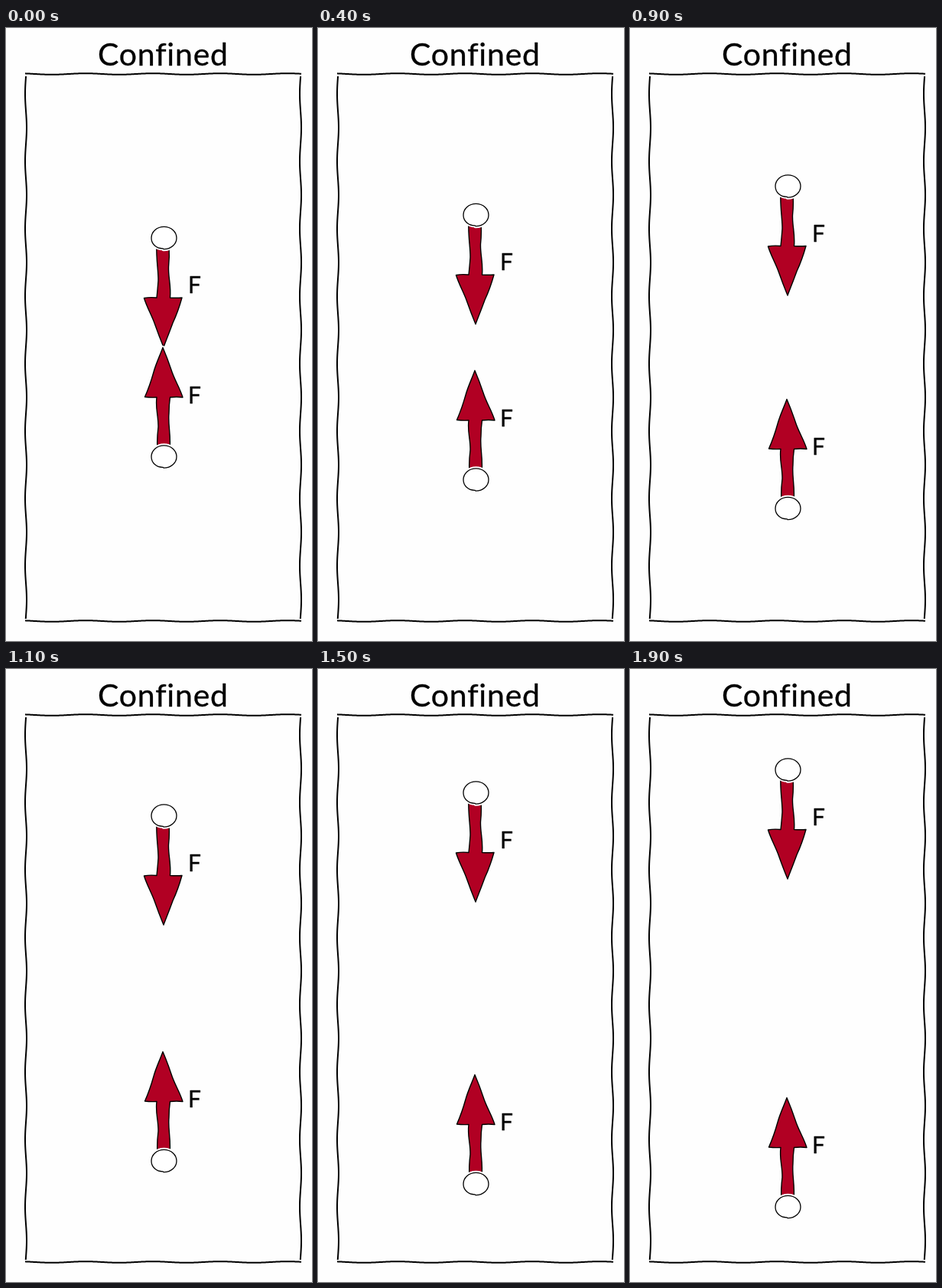
Recreate the animation shown at these times as an HTML page. Size 400 by 800 pixels, loop 2 s.

```html
<!DOCTYPE html>
<html lang="en">
<head>
<meta charset="utf-8">
<title>Confined</title>
<style>
  html, body { margin: 0; width: 100%; height: 100%; overflow: hidden; background: #fefefe; }
  svg { display: block; width: 400px; height: 800px; }
  path { stroke-linejoin: round; stroke-linecap: round; }
  .border { fill: none; stroke: #000; stroke-width: 2; stroke-linecap: butt; }
  .halo { fill: #fff; stroke: #fff; stroke-width: 5; }
  .arrow { fill: #b10023; stroke: #000; stroke-width: 1.4; }
  .ball { fill: #fff; stroke: #000; stroke-width: 1.3; }
  text { font-family: Lato, "Open Sans", sans-serif; stroke: #000; stroke-linejoin: round; }
  .title { font-size: 41px; letter-spacing: .8px; stroke-width: .3; font-variant-ligatures: none; }
  .label { font-size: 30px; stroke-width: .3; }
</style>
</head>
<body>
<svg viewBox="0 0 400 800">
  <defs>
    <path id="ball" d="M205.500 13.800 C196 14 190 7.500 190 0 C190 -8 197 -14.700 206.500 -14.700 C216 -14.700 223 -8 223 0 C223 8 216 14.700 206 14.700"/>
    <path id="down" d="M197 284 C196 302 199.500 318 199 330 Q198 343 197 352 Q188 351 180.500 352.500 C184 364 190 374 194 385 Q200 402 206 416.500 C210 406 214 396 218 385 Q225 370 230 352 Q222 352.500 214.500 352 C216 336 212 326 212.500 312 Q214 298 213 284 Z"/>
    <path id="up" d="M205 417 C201 428 196 438 193 449 Q188 467 181.500 481.500 Q189 482.500 197 482 C195 497 199.500 507 199 521 Q197 537 198 550 L214 550 C216 532 211.500 518 213 503 Q213 492 214.500 482 Q223 481 231 482 C227 469 220 459 216 446 Q211 431 205 417 Z"/>
  </defs>
  <g id="borders"></g>
  <text class="title" x="120" y="48.500">Confined</text>
  <g id="upper">
    <use href="#down" class="arrow"/>
    <g transform="translate(0 274)">
      <use href="#ball" class="halo"/><use href="#ball" class="ball"/>
    </g>
    <text class="label" x="238" y="346">F</text>
  </g>
  <g id="lower">
    <use href="#up" class="halo"/><use href="#up" class="arrow"/>
    <g transform="translate(0 559.500)">
      <use href="#ball" class="halo"/><use href="#ball" class="ball"/>
    </g>
    <text class="label" x="238" y="489.500">F</text>
  </g>
</svg>
<script>
const LOOP = 2000, STEP = 100, SHIFT = 7.5;
const find = id => document.getElementById(id);

// Wavy hand-drawn line along one axis, at a given level on the other.
function wavyLine(from, to, level, crest, size, vertical) {
  const points = [];
  for (let along = from; along <= to; along++) {
    const across = level - size * Math.cos(2 * Math.PI * (along - crest) / 88);
    points.push(vertical ? [across, along] : [along, across]);
  }
  return `<path class="border" d="M${points.join("L")}"/>`;
}

find("borders").innerHTML =
  [60, 774].map(y => wavyLine(25, 386, y, 192, .8, false)).join("") +
  [26, 385].map(x => wavyLine(63, 771, x, 350, 1, true)).join("");

function draw(now) {
  const shift = Math.floor((now % LOOP) / STEP) * SHIFT;
  find("upper").setAttribute("transform", `translate(0 ${-shift})`);
  find("lower").setAttribute("transform", `translate(0 ${shift})`);
  requestAnimationFrame(draw);
}
draw(0);
</script>
</body>
</html>
```
